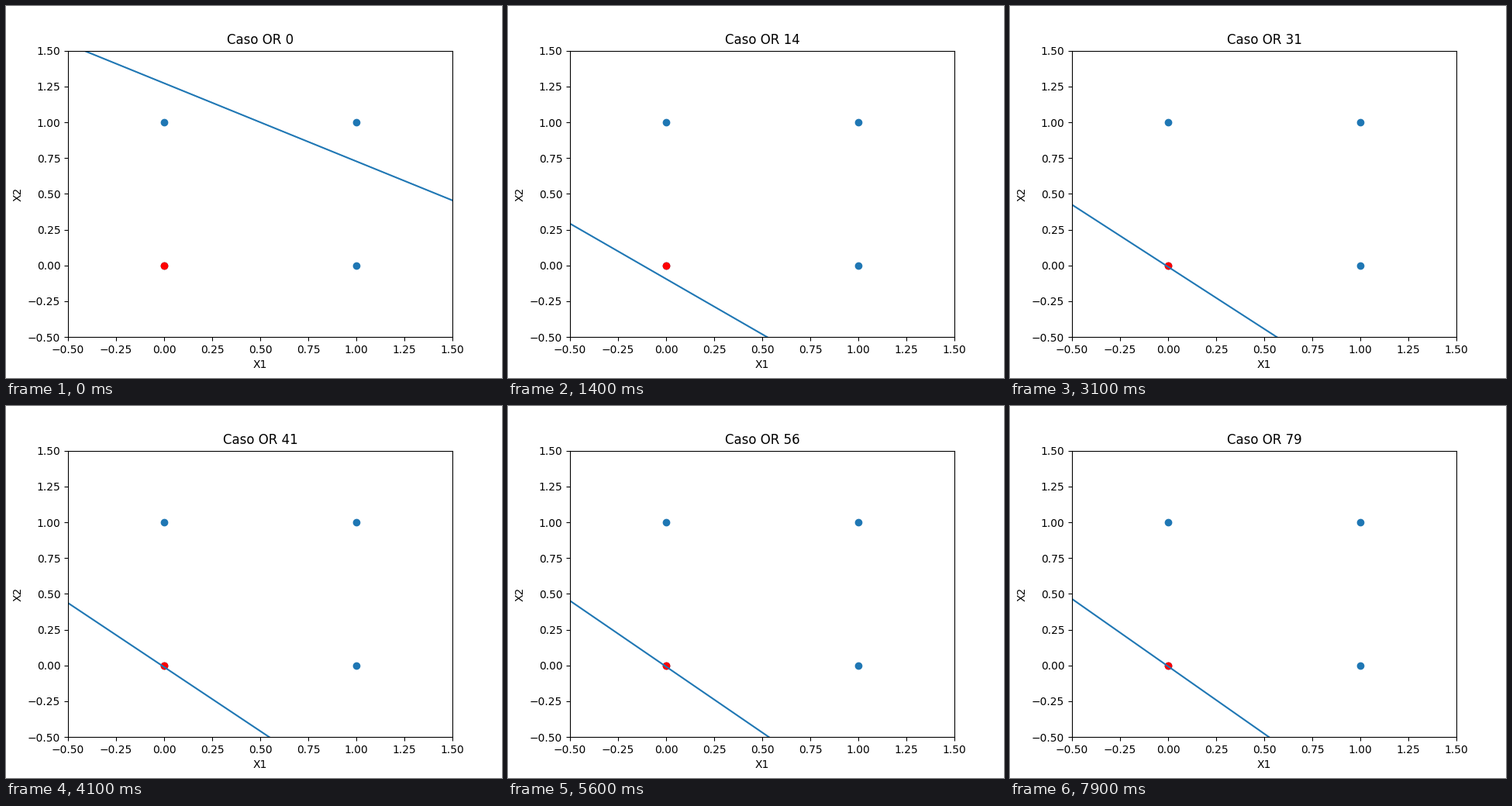
A matplotlib script that plays this animation: 640 by 480 pixels, repeating every 8 s.

```python
import numpy as np
import matplotlib.pyplot as plt
from matplotlib.animation import FuncAnimation

FRAMES = 80
INTERVAL = 100


def weights(n):
    """Neuron weights and bias after n training rounds."""
    w2 = 0.6 + 0.1 * n + 0.5 * np.exp(-n / 15)
    w1 = w2 - 0.5
    bias = 0.05 - 1.25 * np.exp(-n / 7) * np.cos(np.pi * n / 16)
    if n % 11 == 0:  # periodic correction from the red point
        bias -= 0.2
    return w1, w2, bias


def boundary(n):
    w1, w2, bias = weights(n)
    return -(w1 * xs + bias) / w2


fig, ax = plt.subplots(figsize=(6.4, 4.8), dpi=100)
ax.set(xlim=(-0.5, 1.5), ylim=(-0.5, 1.5), xlabel="X1", ylabel="X2")
ax.scatter([0, 0, 1, 1], [0, 1, 0, 1], color="C0")
ax.scatter(0, 0, color="red")
title = ax.set_title("Caso OR 0")
xs = np.array([-1.0, 2.0])
line, = ax.plot(xs, boundary(0), color="C0")


def update(n):
    line.set_ydata(boundary(n))
    title.set_text(f"Caso OR {n}")
    return line, title


anim = FuncAnimation(fig, update, frames=FRAMES, interval=INTERVAL,
                     repeat=True, repeat_delay=0)
plt.show()
```
